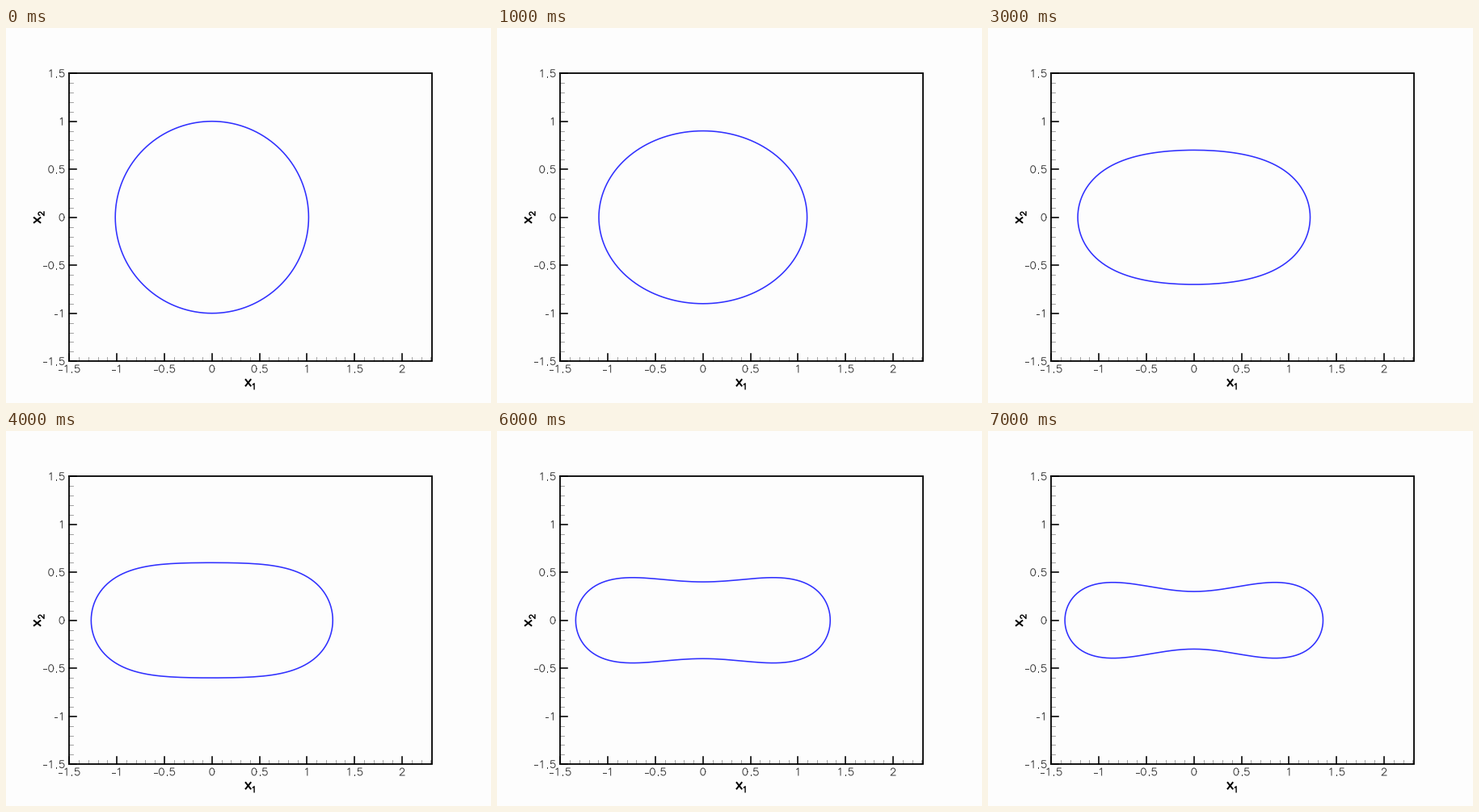
Animation, 600 px wide and 465 px high, one loop 8000 ms. Source, as a matplotlib script:

```python
import numpy as np
import matplotlib.pyplot as plt
from matplotlib.animation import FuncAnimation

W, H, DPI = 600, 465, 100
LEFT, RIGHT, TOP, BOTTOM = 78, 527, 56, 413
INK, GRAY, DARK, BLUE = "#000000", "#8c8c8c", "#3c3c3c", "#3030ff"

plt.rcParams["toolbar"] = "None"
fig = plt.figure(figsize=(W / DPI, H / DPI), dpi=DPI, facecolor="#fdfdfd")
ax = fig.add_axes([0, 0, 1, 1])
ax.set_xlim(0, W)
ax.set_ylim(H, 0)
ax.axis("off")


def px(x):
    return 254.8 + 117.6 * x


def py(y):
    return 234.7 - 119 * y


def line(xs, ys, width, color=INK, **kw):
    return ax.plot(xs, ys, color=color, lw=width * 72 / DPI, **kw)[0]


def arc(cx, cy, rx, ry, start, end):
    t = np.radians(np.linspace(start, end, 25))
    return list(zip(cx + rx * np.cos(t), cy + ry * np.sin(t)))


# Single-stroke glyphs, 21 units high
GLYPHS = {
    "0": arc(10, 10.5, 7, 10.5, 0, 360),
    "1": [(6, 17), (11, 21), (11, 0)],
    "2": arc(10, 15, 6, 6, 170, -35) + [(3, 0), (17, 0)],
    "5": [(15, 21), (5, 21), (4, 12)] + arc(10, 7, 7, 7, 130, -150),
    ".": [(5.5, 0), (5.5, 1.5)],
    "-": [(2, 8), (11, 8)],
}


def advance(c):
    return {".": 11, "-": 14}.get(c, 20)


def text_width(text, size):
    return sum(map(advance, text)) * size / 21


def stroke_text(text, x, y, size, width, color=INK, upright=True):
    """Draw text from its baseline start, rightwards or upwards."""
    scale = size / 21
    pen = 0
    for c in text:
        u, v = np.array(GLYPHS[c]).T * scale
        u = u + pen
        xs, ys = (x + u, y - v) if upright else (x - v, y - u)
        line(xs, ys, width, color, solid_joinstyle="round")
        pen += advance(c) * scale


def draw_axes(size=9):
    for k in range(-14, 24):
        if k % 5:
            line([px(k / 10)] * 2, [BOTTOM, BOTTOM - 5], 0.8, GRAY)
            if k < 15:
                line([LEFT, LEFT + 5], [py(k / 10)] * 2, 0.8, GRAY)
    for v in np.arange(-1.5, 2.5, 0.5):
        text = f"{v:g}"
        w = text_width(text, size)
        line([px(v)] * 2, [BOTTOM, BOTTOM - 9], 1.6)
        stroke_text(text, px(v) - w / 2, 427, size, 1, DARK)
        if v <= 1.5:
            line([LEFT, LEFT + 9], [py(v)] * 2, 1.6)
            stroke_text(text, 73.3 - w, py(v) + size / 2, size, 1, DARK)
    line([LEFT, RIGHT, RIGHT, LEFT, LEFT], [TOP, TOP, BOTTOM, BOTTOM, TOP],
         1.8, solid_joinstyle="miter")


def cross(cx, cy, w, h):
    for s in (-1, 1):
        line([cx - w / 2, cx + w / 2], [cy - s * h / 2, cy + s * h / 2], 2)


def draw_titles():
    cross(299.6, 439.8, 6, 7.5)
    stroke_text("1", 303.4, 447.8, 7, 1.4)
    cross(38.6, 238.2, 7.5, 6)
    stroke_text("2", 47, 233.6, 7, 1.4, upright=False)


draw_axes()
draw_titles()
curve = line([], [], 1.6, BLUE, solid_capstyle="butt")
theta = np.linspace(0, 2 * np.pi, 145)


def update(i):
    # The waist shrinks steadily while the tips move out and slow down
    waist = 1 - 0.1 * i
    reach = 1.356 + 0.154 * waist - 0.493 * waist ** 2
    bulge = 0.23 * (1 - (abs(waist - 0.3) / 0.7) ** 3) ** 3
    x = reach * np.sin(theta)
    y = np.cos(theta) * np.sqrt(waist ** 2 + bulge * x ** 2)
    curve.set_data(px(x), py(y))
    return (curve,)


anim = FuncAnimation(fig, update, frames=8, interval=1000, repeat=True,
                     repeat_delay=0, blit=False)
plt.show()
```
